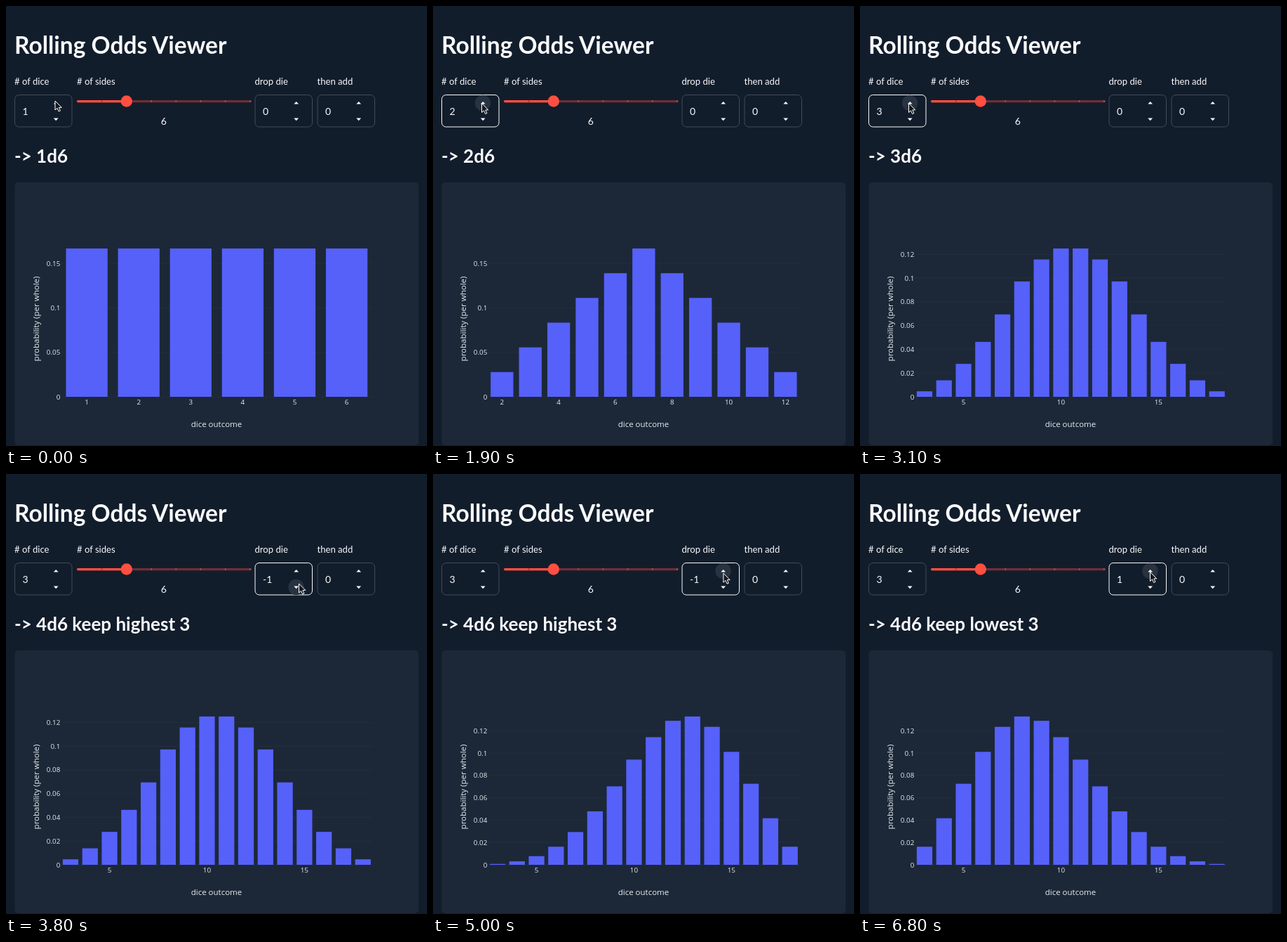
Write an HTML page that moves like this. It is 600 by 626 pixels and loops after 6.9 s.

```html
<!DOCTYPE html>
<html lang="en">
<head>
<meta charset="utf-8">
<title>Dice odds</title>
<style>
  html, body { margin: 0; width: 100%; height: 100%; overflow: hidden; background: #121d2c; }
  svg { display: block; width: 100%; height: 100%; }
  text { fill: #fafafa; font-family: Lato, sans-serif; white-space: pre; }
  .title { font-size: 33.5px; font-weight: 700; }
  .result { font-size: 26px; font-weight: 700; }
  .label { font-size: 13.1px; }
  .value { font-size: 14px; }
  .tick, .axis { font-family: "Open Sans", sans-serif; fill: #e9ebee; }
  .tick { font-size: 9.85px; }
  .axis { font-size: 11.5px; text-anchor: middle; }
  .box { fill: none; stroke: #414a57; }
  .box.focus { stroke: #fafafa; }
  .bar { fill: #5661fa; }
  .grid { stroke: #222e3d; }
</style>
</head>
<body>
<svg id="stage" viewBox="0 0 600 626"></svg>
<script>
const LOOP = 6900, TICK = 100;
const BASE = 556, LEFT = 78.1, SPAN = 444.5, PEAK = 211;
const stage = document.getElementById("stage");

function add(parent, tag, attrs = {}, text) {
  const el = document.createElementNS("http://www.w3.org/2000/svg", tag);
  for (const k in attrs) el.setAttribute(k, attrs[k]);
  if (text !== undefined) el.textContent = text;
  parent.append(el);
  return el;
}
const write = (cls, x, y, text, extra) =>
  add(stage, "text", { class: cls, x, y, ...extra }, text);

// Chance of each total when `count` six-sided dice are rolled and one may be dropped.
function odds(count, drop) {
  const total = 6 ** count, tally = {};
  for (let i = 0; i < total; i++) {
    const roll = Array.from({ length: count }, (_, d) => Math.floor(i / 6 ** d) % 6 + 1);
    let sum = roll.reduce((a, b) => a + b);
    if (drop === "low") sum -= Math.min(...roll);
    if (drop === "high") sum -= Math.max(...roll);
    tally[sum] = (tally[sum] || 0) + 1 / total;
  }
  return Object.entries(tally).map(([k, p]) => [+k, p]);
}
const charts = {
  one: odds(1), two: odds(2), three: odds(3),
  highest: odds(4, "low"), lowest: odds(4, "high")
};

// Page
add(stage, "rect", { width: 600, height: 626, fill: "#121d2c" });
add(stage, "rect", { x: 12.5, y: 251, width: 575.5, height: 374, rx: 5, fill: "#1c2838" });
write("title", 12, 68, "Rolling Odds Viewer");
write("label", 101, 111.5, "# of sides");
const result = write("result", 12, 222.7, "");

// Number inputs
function spinner(x, label, value) {
  write("label", x, 111.5, label);
  const box = add(stage, "rect", { class: "box", x: x + .5, y: 126.5, width: 81.5, height: 45.5, rx: 6 });
  const halo = add(stage, "circle", { cx: x + 59, cy: 138, r: 11.2, fill: "#283241" });
  const mid = x + 59.2;
  add(stage, "path", { d: `M${mid - 3.4} 139.6l3.4-3.6 3.4 3.6zM${mid - 3.4} 159.6l3.4 3.6 3.4-3.6z`, fill: "#fafafa" });
  const text = write("value", x + 11.5, 154.5, value);
  return { box, halo, text };
}
const dice = spinner(12, "# of dice", "1");
const drop = spinner(354.5, "drop die", "0");
spinner(443.5, "then add", "0").halo.style.display = "none";

// Slider
const track = { x: 101, y: 133.9, height: 3.3, rx: 1.6 };
add(stage, "rect", { ...track, width: 249, fill: "#6f2e34" });
add(stage, "rect", { ...track, width: 71, fill: "#ff4f40" });
for (let i = 1; i < 8; i++)
  add(stage, "circle", { cx: 101.5 + i * 35.2, cy: 135.5, r: .9, fill: i < 2 ? "#7a2a2a" : "#c06a66" });
add(stage, "circle", { cx: 171.8, cy: 135.5, r: 8.2, fill: "#ff4f40" });
write("value", 224.8, 169.3, "6", { "text-anchor": "middle" });

// Chart
const plot = add(stage, "g");
write("axis", 300, 598.5, "dice outcome");
write("axis", 0, 0, "probability (per whole)", { transform: "translate(46.7 445) rotate(-90)" });

function drawChart(data) {
  plot.replaceChildren();
  const max = Math.max(...data.map(d => d[1]));
  const rise = max > .15 ? .05 : .02;
  const every = data.length > 12 ? 5 : data.length > 6 ? 2 : 1;
  const step = SPAN / data.length;
  for (let i = 0; i * rise <= max; i++) {
    const y = BASE - i * rise / max * PEAK;
    add(plot, "line", { class: "grid", x1: LEFT, x2: LEFT + SPAN, y1: y, y2: y });
    add(plot, "text", { class: "tick", x: 77.3, y: y + 3.5, "text-anchor": "end" }, +(i * rise).toFixed(2));
  }
  data.forEach(([sum, p], i) => {
    const h = p / max * PEAK, x = LEFT + step * i;
    add(plot, "rect", { class: "bar", x: x + step * .1, y: BASE - h, width: step * .8, height: h });
    if (sum % every === 0)
      add(plot, "text", { class: "tick", x: x + step / 2, y: 566.5, "text-anchor": "middle" }, sum);
  });
}

const pointer = add(stage, "path", {
  d: "M0 0V13L3 10.3L5.1 15L7.4 14L5.4 9.4H9.3Z",
  fill: "#14171c", stroke: "#fff", "stroke-width": 1, "stroke-linejoin": "round"
});

// Each step keeps what earlier steps set.
const steps = [
  [0, { dice: "1", drop: "0", focus: "", hover: "", result: "-> 1d6", chart: "one" }],
  [300, { hover: "dice" }],
  [1300, { dice: "2", focus: "dice" }],
  [1500, { result: "-> 2d6" }],
  [1800, { chart: "two" }],
  [2000, { dice: "3" }],
  [2200, { result: "-> 3d6" }],
  [2300, { chart: "three" }],
  [3200, { hover: "" }],
  [3400, { hover: "drop" }],
  [3500, { drop: "-1", focus: "drop" }],
  [3800, { result: "-> 4d6 keep highest 3" }],
  [3900, { chart: "highest" }],
  [5400, { drop: "0" }],
  [5600, { drop: "1" }],
  [6000, { result: "-> 4d6 keep lowest 3" }],
  [6100, { chart: "lowest" }]
];
const path = [
  [0, 70, 135], [300, 70, 135], [800, 69.5, 138.5], [3100, 69.5, 138.5],
  [3500, 417.5, 156], [4600, 417.5, 156], [5100, 413.5, 139.5], [LOOP, 413.5, 139.5]
];

function pointerAt(t) {
  const i = path.findIndex(p => p[0] > t);
  const [t0, x0, y0] = path[i - 1], [t1, x1, y1] = path[i];
  const k = (t - t0) / (t1 - t0), e = k * k * (3 - 2 * k);
  return [x0 + (x1 - x0) * e, y0 + (y1 - y0) * e];
}

let shown = "";
function render(t) {
  const s = Object.assign({}, ...steps.filter(p => p[0] <= t).map(p => p[1]));
  const [x, y] = pointerAt(t);
  pointer.setAttribute("transform", `translate(${x} ${y})`);
  for (const [name, field] of [["dice", dice], ["drop", drop]]) {
    field.text.textContent = s[name];
    field.box.classList.toggle("focus", s.focus === name);
    field.halo.style.display = s.hover === name ? "" : "none";
  }
  drop.halo.setAttribute("cy", y > 149 ? 161 : 138);
  result.textContent = s.result;
  if (s.chart !== shown) drawChart(charts[shown = s.chart]);
}

const start = performance.now();
function loop() {
  const t = (performance.now() - start) % LOOP;
  render(Math.floor(t / TICK) * TICK);
  requestAnimationFrame(loop);
}
loop();
</script>
</body>
</html>
```
